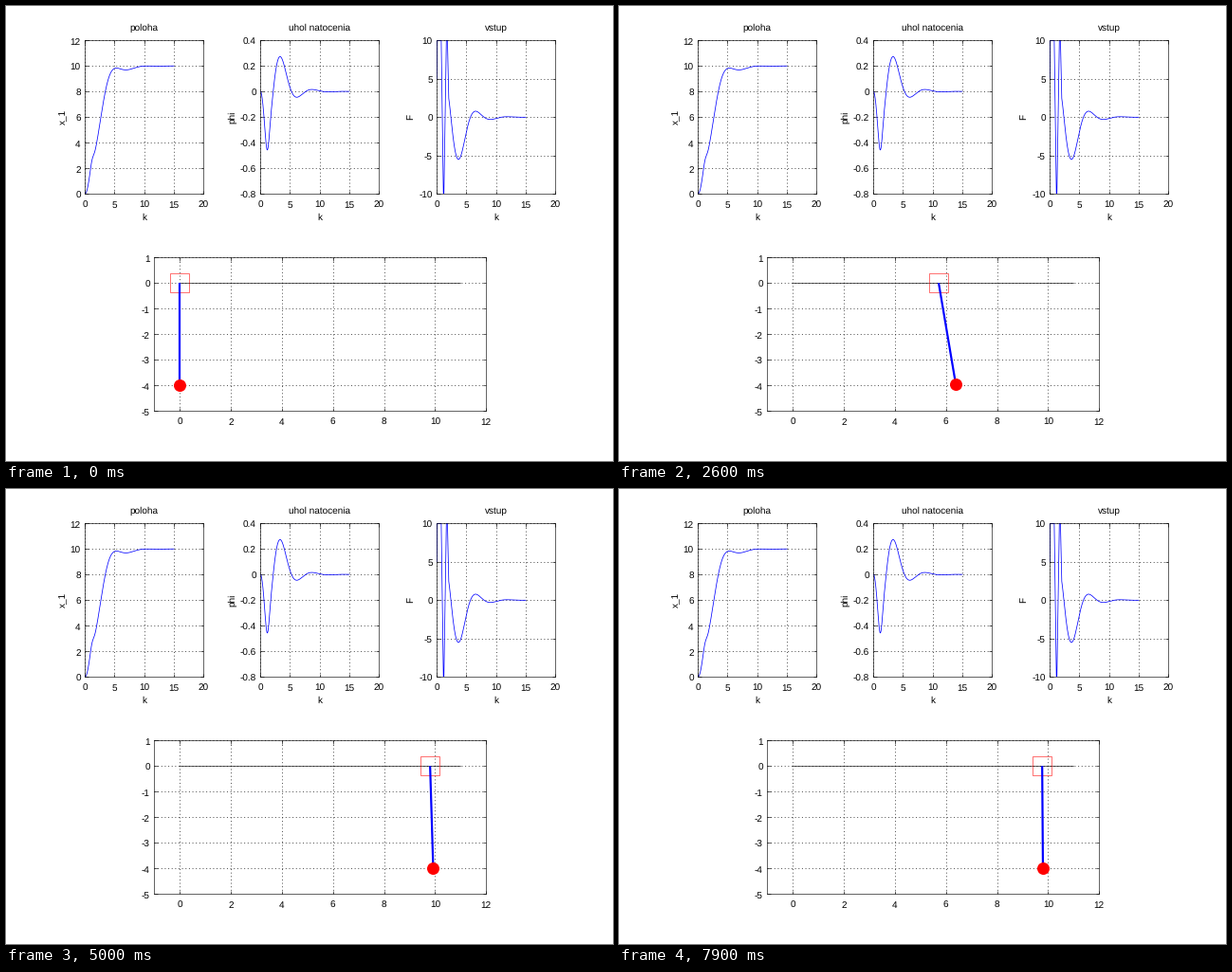
Recreate the animation shown at these times as a matplotlib script. Size 640x480 px, loop 8000 ms.

```python
import numpy as np
import matplotlib.pyplot as plt
from matplotlib.animation import FuncAnimation

W, H, DPI = 640, 480, 80
PX = 72 / DPI          # one pixel in points
FRAMES, STEP = 80, 100

# Crane model: cart, hanging load, rod length, gravity
CART, LOAD, ROD, G = 2, 1, 4, 9.81
GOAL, LIMIT = 10, 10
DT, END = 0.005, 15

plt.rcParams.update({"font.family": "Liberation Sans", "font.size": 10 * PX,
                     "text.hinting": "none"})


def force(t, x, v, phi, w):
    """Bang-bang push for two seconds, then state feedback."""
    if t < 2:
        return np.interp(t, [0, 0.05, 0.75, 1.1, 1.2, 1.6, 1.8, 2],
                         [5, 10, 10, -10, -10, 10, 10, 2.6])
    u = (GOAL - x) - 3.2 * v + 1.6 * phi + 10.7 * w
    return np.clip(u, -LIMIT, LIMIT)


def simulate():
    times = np.arange(0, END + DT / 2, DT)
    x = v = phi = w = 0.0
    rows = []
    for t in times:
        f = force(t, x, v, phi, w)
        rows.append((x, phi, f))
        s, c = np.sin(phi), np.cos(phi)
        acc = (f + LOAD * s * (G * c + ROD * w**2)) / (CART + LOAD * s**2)
        v += acc * DT
        w -= (acc * c + G * s) / ROD * DT
        x += v * DT
        phi += w * DT
    return times, *np.array(rows).T


fig = plt.figure(figsize=(W / DPI, H / DPI), dpi=DPI, facecolor="white")


def text(x, y, s, **kw):
    kw = {"ha": "center", "va": "baseline", **kw}
    fig.text(x / W, 1 - y / H, s, **kw)


def panel(left, top, width, height, xlim, ylim, xticks, yticks):
    """Boxed axes with a dotted grid, placed in pixels from the top left."""
    ax = fig.add_axes([left / W, 1 - (top + height) / H, width / W, height / H])
    ax.set(xlim=xlim, ylim=ylim, xticks=xticks, yticks=yticks)
    ax.tick_params(direction="in", top=True, right=True, length=3.5 * PX,
                   width=0.6 * PX, labelbottom=False, labelleft=False)
    ax.grid(color="black", lw=0.65 * PX, ls=(0, (1.6, 4)))
    for side in ax.spines.values():
        side.set_linewidth(0.6 * PX)
    for v in xticks:
        x = left + width * (v - xlim[0]) / (xlim[1] - xlim[0])
        text(x, top + height + 15, f"{v:g}")
    for v in yticks:
        y = top + height * (ylim[1] - v) / (ylim[1] - ylim[0])
        text(left - 4.5, y + 4.5, f"{round(v, 3) + 0.0:g}", ha="right")
    return ax


def chart(left, title, ylabel, label_x, yticks, values):
    ax = panel(left, 36.2, 125, 162, (0, 20), (yticks[0], yticks[-1]),
               range(0, 21, 5), yticks)
    ax.plot(times, values, color="blue", lw=0.75 * PX)
    text(left + 62.5, 26, title)
    text(left + 62.5, 226, "k")
    text(label_x, 117, ylabel, rotation=90, va="center")


times, cart_x, tilt, push = simulate()

chart(83.2, "poloha", "x_1", 60, np.linspace(0, 12, 7), cart_x)
chart(268.2, "uhol natocenia", "phi", 239, np.linspace(-0.8, 0.4, 7), tilt)
chart(454.2, "vstup", "F", 427, np.linspace(-10, 10, 5), push)

stage = panel(156.2, 265.2, 350, 162, (-1, 12), (-5, 1),
              range(0, 13, 2), range(-5, 2))
stage.plot([0, 11], [0, 0], color="black", lw=0.6 * PX)
cart, = stage.plot([], [], "s", ms=20 * PX, mfc="none", mec="red",
                   mew=0.55 * PX, zorder=3)
rod, = stage.plot([], [], color="blue", lw=2.2 * PX, zorder=4,
                  solid_capstyle="butt")
bob, = stage.plot([], [], "o", ms=13 * PX, color="red", mew=0, zorder=5)


def draw(i):
    n = round(i * STEP / 1000 / DT)
    x, phi = cart_x[n], tilt[n]
    bx, by = x + ROD * np.sin(phi), -ROD * np.cos(phi)
    cart.set_data([x], [0])
    rod.set_data([x, bx], [0, by])
    bob.set_data([bx], [by])
    return cart, rod, bob


anim = FuncAnimation(fig, draw, frames=FRAMES, interval=STEP, repeat=True,
                     repeat_delay=0)
plt.show()
```
